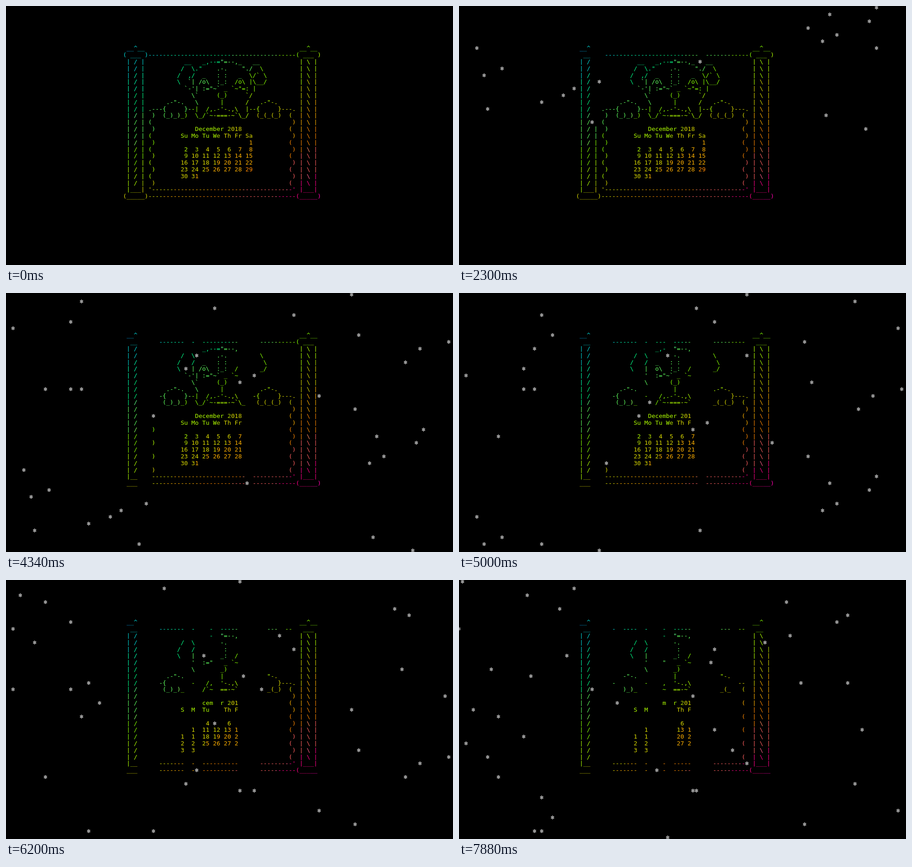
Animation of 982x570 px, one loop 8 s. Source, as an HTML page with a canvas:

```html
<!DOCTYPE html>
<html lang="en">
<head>
<meta charset="utf-8">
<title>Snow over a calendar</title>
<style>
  html, body { margin: 0; width: 100%; height: 100%; overflow: hidden; background: #000; }
  canvas { display: block; }
</style>
</head>
<body>
<canvas id="stage" width="982" height="570"></canvas>

<script type="text/plain" id="lion">
          __   _,--="=--,_   __
         /  \."    .-.    "./  \
        /  ,/  _   : :   _  \/` \
        \  `| /o\  :_:  /o\ |\__/
          `-'| :="~` _ `~"=: |
            \`     (_)     `/
     .-"-.   \      |      /   .-"-.
.---{     }--|  /,.-'-.,\  |--{     }---.
 )  (_)_)_)  \_/`~-===-~`\_/  (_(_(_)  (
</script>

<script type="text/plain" id="calendar">
    December 2018
Su Mo Tu We Th Fr Sa
                   1
 2  3  4  5  6  7  8
 9 10 11 12 13 14 15
16 17 18 19 20 21 22
23 24 25 26 27 28 29
30 31
</script>

<script>
const CELL_W = 7.91, CELL_H = 14.82, BASELINE = 8.3, ROWS = 39;
const LOOP = 8000, SNOW_START = 500, TICK = 60, STEP = 99.2;
const FLAKE = '\u2744';

// Each step drops one flake in the next of these columns.
const DROPS = [
  113, 37, 102, 8, 23, 29, 32, 39, 7, 12, 67, 116, 5, 101, 105, 97, 114, 103, 116,
  18, 41, 97, 21, 87, 11, 65, 69, 50, 111, 53, 115, 123,
  98, 2, 18, 80, 58, 21, 96, 26, 122, 71, 23, 66, 110, 80,
  55, 80, 8, 76, 2, 18,
  112, 108, 11, 4, 44, 65, 37, 95, 20, 9, 70, 30,
  71, 85, 92, 0, 105, 108, 28, 91, 19, 32, 1
];

const ctx = document.getElementById('stage').getContext('2d');
const emptyScreen = () => Array.from({ length: ROWS }, () => []);
const banner = emptyScreen();

function put(col, row, text) {
  [...text].forEach((char, i) => {
    if (char !== ' ') banner[row][col + i] = char;
  });
}

function putBlock(id, col, row) {
  const lines = document.getElementById(id).textContent.slice(1).split('\n');
  lines.forEach((line, i) => put(col, row + i, line));
}

function buildBanner() {
  const rail = '-'.repeat(41);
  put(34, 6, '__^__');
  put(82, 6, '__^__');
  put(33, 7, '( ___ )' + rail + '( ___ )');
  for (let row = 8; row <= 26; row++) {
    put(34, row, '| / |');
    put(82, row, '| \\ |');
    if (row > 16) {
      const odd = row % 2;
      put(odd ? 40 : 41, row, odd ? '(' : ')');
      put(odd ? 80 : 79, row, odd ? ')' : '(');
    }
  }
  put(34, 27, "|___| '" + rail.slice(2) + "' |___|");
  put(33, 28, '(_____)' + rail + '(_____)');
  putBlock('lion', 40, 8);
  putBlock('calendar', 49, 18);
}

// Diagonal rainbow, rounded to the 6x6x6 terminal colour cube.
function rainbow(col, row) {
  const angle = 41.3 * Math.PI / 180 + (col - 55.5) / 30 + (row - 24) / 10;
  const channels = [0, 1, 2].map(i => {
    const value = Math.sin(angle + i * 2 * Math.PI / 3) * 127 + 128;
    const level = Math.floor(value * 6 / 256);
    return level ? 55 + 40 * level : 0;
  });
  return `rgb(${channels})`;
}

// Flakes blank their old cell and the cell to their right as they fall.
// A column that gets a new flake leaves its previous one hanging.
function screenAt(step) {
  const screen = banner.map(line => line.slice());
  const flakes = new Map();
  const set = (row, col, char) => { if (row < ROWS) screen[row][col] = char; };
  for (let i = 0; i <= step; i++) {
    flakes.set(DROPS[i], -1);
    for (const [col, row] of flakes) {
      set(Math.max(row, 0), col, ' ');
      set(row + 1, col, FLAKE);
      set(row + 1, col + 1, ' ');
      flakes.set(col, row + 1);
    }
  }
  return screen;
}

function draw(step) {
  ctx.fillStyle = '#000';
  ctx.fillRect(0, 0, 982, 570);
  ctx.font = '13.14px "DejaVu Sans Mono", monospace';
  ctx.textAlign = 'center';
  screenAt(step).forEach((line, row) => line.forEach((char, col) => {
    if (char === ' ') return;
    ctx.fillStyle = char === FLAKE ? '#fff' : rainbow(col, row);
    ctx.fillText(char, col * CELL_W, BASELINE + row * CELL_H);
  }));
}

let shownStep = null;
function frame() {
  const elapsed = performance.now() % LOOP - SNOW_START;
  const shown = Math.floor(elapsed / TICK) * TICK;
  const step = elapsed < 0 ? -1 : Math.min(Math.floor(shown / STEP), DROPS.length - 1);
  if (step !== shownStep) draw(shownStep = step);
  requestAnimationFrame(frame);
}

buildBanner();
frame();
</script>
</body>
</html>
```
